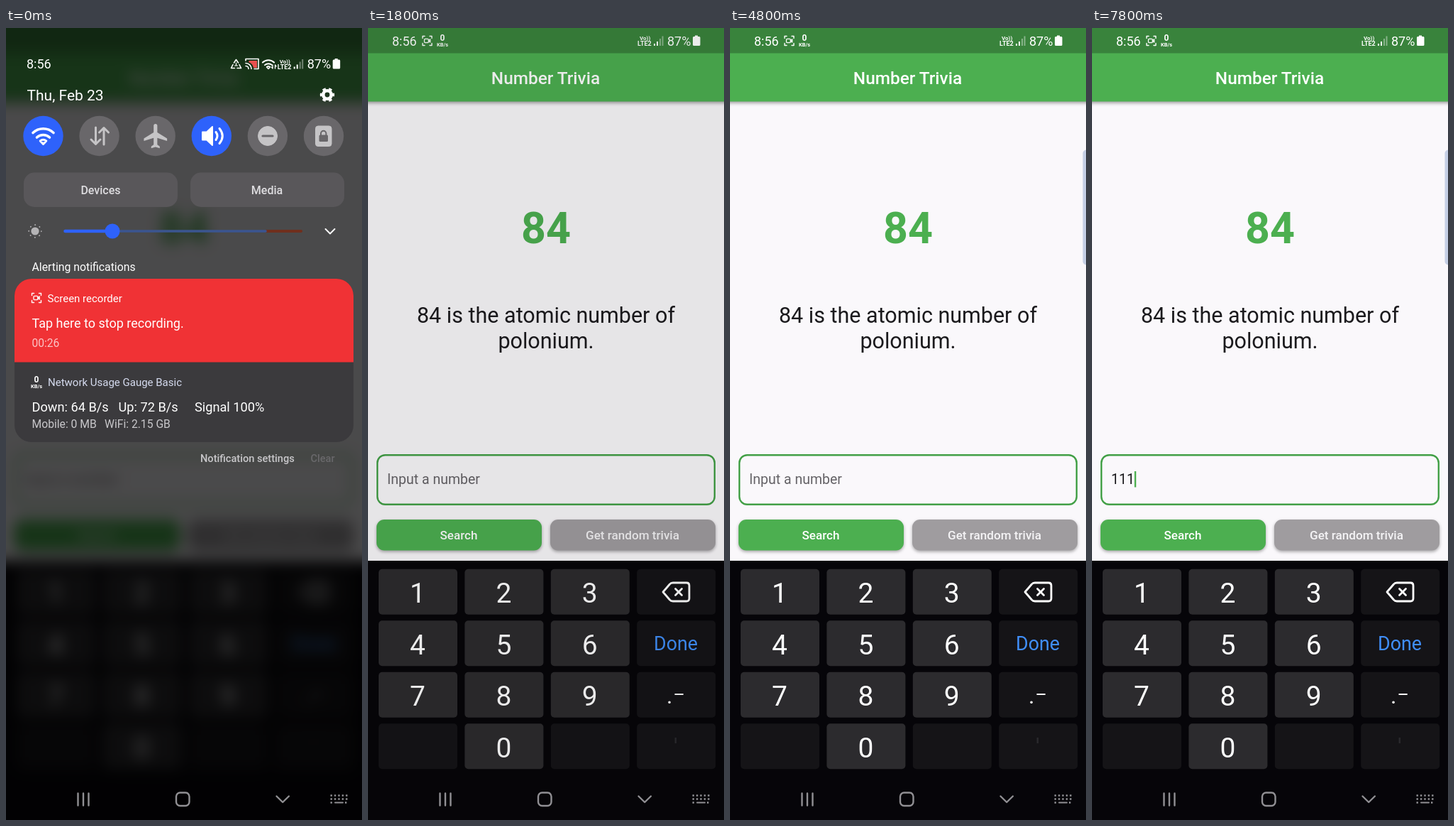
Recreate the animation shown at these times as an HTML page. Size 502 px wide and 1115 px high, loop 8000 ms.

```html
<!DOCTYPE html>
<html lang="en">
<head>
<meta charset="utf-8">
<title>Number Trivia</title>
<style>
  html, body { margin: 0; width: 100%; height: 100%; overflow: hidden; background: #060509; }
  svg { display: block; width: 502px; height: 1115px; font-family: Roboto, sans-serif; }
  .mid { text-anchor: middle; }
  .medium { font-weight: 500; }
  .bold { font-weight: 700; }
  .line { fill: none; stroke-linecap: round; stroke-linejoin: round; }
  .bar { filter: drop-shadow(0 2px 2.5px #0006); }
  .button { filter: drop-shadow(0 2px 2px #0005); }
  .blurred { filter: blur(10px); }
  .tile { fill: #69676a; }
  .tile.on { fill: #2e62fb; }
  .glyph { fill: #c5c4c6; stroke: #c5c4c6; }
  .glyph.on { fill: #fff; stroke: #fff; }
</style>
</head>
<body>
<svg viewBox="0 0 502 1115">
  <defs>
    <g id="recorder" class="line" stroke="currentColor" stroke-width="1.4">
      <path d="M-6.5-3.5v-3h3M3.5-6.5h3v3M6.5 3.5v3h-3M-3.5 6.5h-3v-3"/>
    </g>
    <g id="camera" class="line" stroke="currentColor" stroke-width="1.3">
      <rect x="-4" y="-2.7" width="5.8" height="5.4" rx="1.2"/>
      <path d="M2-.4 4.2-2V2L2 .4"/>
    </g>
    <g id="speed" class="mid bold" fill="currentColor">
      <text y="0" font-size="12">0</text>
      <text y="8" font-size="7.5">KB/s</text>
    </g>
    <g id="phone" fill="#fff">
      <g class="bold">
        <text x="383" y="17" font-size="8">Vo))</text>
        <text x="380" y="25" font-size="9">LTE2</text>
      </g>
      <path d="M403 22h2v3h-2zM407 19h2v6h-2z"/>
      <path d="M411 15h2v10h-2zM414.500 11.500h2v13.500h-2z" opacity=".4"/>
      <text x="422" y="24.500" font-size="18">87%</text>
      <path d="M461 10.500h4v1.500h2a1.500 1.500 0 0 1 1.500 1.500v10a1.500 1.500 0 0 1-1.500 1.500h-7.500a1.500 1.500 0 0 1-1.500-1.500v-10a1.500 1.500 0 0 1 1.500-1.500h1.500z"/>
    </g>
    <g id="wifi">
      <path class="line" stroke-width="3.6" d="M-14.500-4.500A21 21 0 0 1 14.500-4.500M-9 2A13.200 13.200 0 0 1 9 2"/>
      <path class="line" stroke-width="3" d="M-4.300 7A7 7 0 0 1 4.300 7L0 11.500Z"/>
    </g>
    <clipPath id="cardShape"><rect x="12" y="353" width="478" height="230" rx="24"/></clipPath>
  </defs>

  <g id="app">
    <rect x="-60" y="-60" width="622" height="820" fill="#faf8fb"/>
    <text class="mid bold" x="251" y="303" font-size="61" fill="#4caf50">84</text>
    <g class="mid" font-size="30.500" fill="#1b1a1d">
      <text x="251" y="415">84 is the atomic number of</text>
      <text x="251" y="451">polonium.</text>
    </g>
    <rect x="13.200" y="601.200" width="475.600" height="69.600" rx="11" fill="none" stroke="#43a047" stroke-width="2.400"/>
    <text id="entry" x="27" y="641.500" font-size="19.500"></text>
    <rect id="cursor" y="624" width="2.400" height="22.500" fill="#4caf50"/>
    <g class="mid medium" font-size="17.100">
      <rect class="button" x="12" y="692" width="233" height="43.500" rx="11" fill="#4caf50"/>
      <rect class="button" x="257" y="692" width="233" height="43.500" rx="11" fill="#9f9c9f"/>
      <text x="128" y="720" fill="#fff">Search</text>
      <text x="373" y="720" fill="#f5f4f6">Get random trivia</text>
    </g>
    <rect class="bar" x="-60" y="-60" width="622" height="163.500" fill="#4caf50"/>
    <rect x="-60" y="-60" width="622" height="95.500" fill="#39833c"/>
    <text class="mid medium" x="250.500" y="78.500" font-size="24.400" fill="#fff">Number Trivia</text>
    <rect x="-60" y="750" width="622" height="425" fill="#060509"/>
    <g id="keys"></g>
    <g class="line" stroke="#fff" stroke-width="2.800">
      <path d="M416 794 425.500 783Q427 781 430 781H449Q453 781 453 785V803Q453 807 449 807H430Q427 807 425.500 805Z"/>
      <path d="M433.500 789.500l9 9M442.500 789.500l-9 9"/>
    </g>
    <text class="mid" x="434" y="876" font-size="26.800" fill="#408ffa">Done</text>
    <g fill="#fff">
      <text x="421" y="951" font-size="32">.</text>
      <text x="430.500" y="947" font-size="25">–</text>
    </g>
    <rect x="432.500" y="999" width="2.500" height="8" fill="#29282c"/>
  </g>

  <g id="appStatus" color="#fff" fill="#fff">
    <text x="34" y="24.500" font-size="18">8:56</text>
    <use href="#recorder" x="83.500" y="18"/>
    <use href="#camera" class="cameraBlink" x="83.500" y="18"/>
    <use href="#speed" x="105" y="18"/>
    <use href="#phone"/>
  </g>
  <rect id="handle" x="497.500" y="171.500" width="12" height="162" rx="5" fill="#c5cfe5"/>
  <rect id="shade" width="502" height="1115"/>

  <g id="panel" fill="#fff" color="#fff">
    <text x="29" y="57" font-size="18">8:56</text>
    <use href="#phone" x="2.700" y="32.500"/>
    <g id="statusIcons" class="line" stroke="#fff" stroke-width="1.600">
      <path d="M321.500 49 324.500 44.500 327.500 49M329 51.500 331.500 56.500H326M322.500 56.500H317.500L320 51.500"/>
      <path d="M324.500 49v4M322.500 53h4" stroke-width="1.200"/>
      <path d="M343 46H354V56H349Q348 50 342 48Z" fill="#e8504f" stroke="none"/>
      <path d="M338 46V43.500H356V57.500H350M338 49.500A8 8 0 0 1 346 57.500M338 53.500A4 4 0 0 1 342 57.500"/>
    </g>
    <g id="statusWifi" stroke="#fff">
      <use href="#wifi" transform="translate(370 51) scale(.56)"/>
      <path class="line" stroke-width="1.300" d="M376 52v5l-1.500-2M379.500 57v-5l1.500 2"/>
    </g>
    <text x="29.500" y="102" font-size="21">Thu, Feb 23</text>
    <g fill="none" stroke="#fff">
      <circle cx="453" cy="94" r="5.700" stroke-width="4.600"/>
      <circle cx="453" cy="94" r="8.700" stroke-width="3" pathLength="12" stroke-dasharray="1 1" stroke-dashoffset=".5"/>
    </g>

    <circle id="ring" cx="52.500" cy="152" r="32.500" fill="#fff"/>
    <g id="tiles"></g>
    <use id="wifiGlyph" href="#wifi" x="52.500" y="152"/>
    <path class="line glyph" stroke-width="3" style="fill:none" d="M126.500 140v23M120 157l6.500 6.500 6.500-6.500M138 164v-23M131.500 147l6.500-6.500 6.500 6.500"/>
    <path class="glyph" stroke="none" style="stroke:none" transform="translate(191 131.500) scale(1.720)" d="M21 16v-2l-8-5V3.500a1.500 1.500 0 0 0-3 0V9l-8 5v2l8-2.500V19l-2 1.500V22l3.500-1 3.500 1v-1.500L13 19v-5.500z"/>
    <path stroke="#fff" stroke-width="2" stroke-linejoin="round" d="M277 146.500h6l8-7.500v26l-8-7.500h-6z"/>
    <path class="line" stroke="#fff" stroke-width="3" d="M296 146.500q4 5.500 0 11M301 141.500q8.500 10.500 0 21"/>
    <circle class="glyph" cx="369" cy="152" r="13.500"/>
    <path class="line" stroke="#69676a" stroke-width="3.200" d="M362 152h14"/>
    <rect class="glyph" x="436.500" y="138" width="22.500" height="28.500" rx="3.500"/>
    <rect class="tile" x="441.500" y="150.500" width="12.500" height="9.500" rx="1.500"/>
    <path class="line" stroke="#69676a" stroke-width="2" d="M444 151v-2.500a3.700 3.700 0 0 1 7.400 0v2.500"/>

    <g class="mid medium" font-size="16">
      <rect x="25" y="203.500" width="217" height="48.500" rx="15" fill="#59575a"/>
      <rect x="260" y="203.500" width="217" height="48.500" rx="15" fill="#59575a"/>
      <text x="133.500" y="233.500" fill="#dedde0">Devices</text>
      <text x="368" y="233.500" fill="#dedde0">Media</text>
    </g>
    <g class="line">
      <circle cx="41" cy="286" r="5.600" fill="#b5b4b6"/>
      <circle cx="41" cy="286" r="8.800" stroke="#b5b4b6" stroke-width="1.700" pathLength="16" stroke-dasharray=".1 1.900"/>
      <path d="M367 286h49" stroke="#702f1d" stroke-width="4"/>
      <path d="M150 286h216" stroke="#3b5590" stroke-width="3.600"/>
      <path d="M83.500 286H150" stroke="#2e62fb" stroke-width="4.500"/>
      <circle cx="150" cy="286" r="10.500" fill="#2e62fb"/>
      <path d="M450.500 283l6.500 6.500 6.500-6.500" stroke="#fff" stroke-width="1.900"/>
    </g>

    <g id="notifications">
      <text x="36.500" y="342" font-size="15.800">Alerting notifications</text>
      <g clip-path="url(#cardShape)">
        <rect x="12" y="353" width="478" height="230" fill="#3b3a3d"/>
        <rect x="12" y="353" width="478" height="117.500" fill="#f03235"/>
      </g>
      <use href="#recorder" x="43" y="380"/>
      <use href="#camera" class="cameraBlink" x="43" y="380"/>
      <text x="58.500" y="385.500" font-size="15">Screen recorder</text>
      <text x="36.500" y="421.500" font-size="18">Tap here to stop recording.</text>
      <text id="timer" x="36.500" y="448.500" font-size="15.600" fill="#fbc4c5"></text>
      <use href="#speed" x="43" y="498.500"/>
      <text x="59" y="504" font-size="15" fill="#d6dcf0">Network Usage Gauge Basic</text>
      <g font-size="18.200">
        <text id="down" x="36.500" y="540"></text>
        <text id="up" x="158.500" y="540"></text>
        <text x="266" y="540">Signal 100%</text>
      </g>
      <g font-size="15.700" fill="#c9c8cb">
        <text x="36.500" y="563">Mobile: 0 MB</text>
        <text x="139" y="563">WiFi: 2.15 GB</text>
      </g>
    </g>
    <g id="compact">
      <use href="#recorder" x="43" y="346"/>
      <use href="#camera" x="43" y="346"/>
      <use href="#speed" x="65" y="347"/>
    </g>
    <g id="footer" class="medium" font-size="14.600">
      <text x="274" y="611" fill="#c8c7ca">Notification settings</text>
      <text x="429.500" y="611" fill="#69686b">Clear</text>
    </g>
    <text id="carrier" class="mid" x="251" y="1038.500" font-size="13" fill="#77767a">itavelis</text>
  </g>

  <g class="line" stroke="#919094" stroke-width="2.400">
    <path d="M101.500 1077.500v17M109 1077.500v17M116.500 1077.500v17"/>
    <rect x="240" y="1076.500" width="18.500" height="18.500" rx="5.500"/>
    <path d="M381.500 1081.500l8.700 8.500 8.700-8.500"/>
    <path stroke-linecap="butt" stroke-dasharray="2.400 3" d="M457.500 1080.500h25M457.500 1085.500h25M457.500 1090.500h4M478 1090.500h4"/>
    <path stroke-width="2" d="M464 1090.500h11"/>
  </g>
</svg>
<script>
const LOOP = 8000, STEP = 100;
const $ = id => document.getElementById(id);
const show = (el, on) => { el.style.display = on ? '' : 'none'; };
const ramp = (t, from, to) => Math.min(1, Math.max(0, (t - from) / (to - from)));
const during = (t, from, to) => t >= from && t < to;

function add(parent, tag, attrs, text = '') {
  const el = document.createElementNS('http://www.w3.org/2000/svg', tag);
  for (const name in attrs) el.setAttribute(name, attrs[name]);
  el.textContent = text;
  return parent.appendChild(el);
}

['123', '456', '789', ' 0 '].forEach((digits, row) => {
  for (let col = 0; col < 4; col++) {
    const label = (digits[col] || '').trim();
    const x = 15 + col * 121.4, y = 761.7 + row * 72.5;
    const key = add($('keys'), 'rect', {
      x, y, width: 111, height: 64, rx: 5, fill: label ? '#2c2b2e' : '#151417'
    });
    if (!label) continue;
    key.id = 'key' + label;
    add($('keys'), 'text', { x: x + 55, y: y + 47.5, 'font-size': 39, class: 'mid', fill: '#fff' }, label);
  }
});

const tiles = [0, 1, 2, 3, 4, 5].map(i => add($('tiles'), 'circle', {
  cx: 52.5 + i * 79.1, cy: 152, r: 28.2, class: i === 3 ? 'tile on' : 'tile'
}));

function drawPanel(t) {
  const collapsed = t >= 1700;
  const wifiOn = t < 1200;
  const statusWifi = t < 1400;
  const fresh = t >= 300;
  show($('notifications'), !collapsed);
  show($('compact'), collapsed);
  $('footer').setAttribute('transform', `translate(0 ${collapsed ? -259.5 : 0})`);
  $('carrier').style.opacity = ramp(t, 0, 400);
  $('timer').textContent = t < 800 ? '00:26' : '00:27';
  $('down').textContent = `Down: ${fresh ? 52 : 64} B/s`;
  $('up').textContent = `Up: ${fresh ? 52 : 72} B/s`;
  $('ring').style.opacity = t < 1000 ? 0 : 0.2 * (1 - ramp(t, 1100, 1500));
  tiles[0].classList.toggle('on', wifiOn);
  $('wifiGlyph').setAttribute('class', wifiOn ? 'glyph on' : 'glyph');
  show($('statusWifi'), statusWifi);
  $('statusIcons').setAttribute('transform', `translate(${statusWifi ? 0 : 22} 0)`);
}

function drawEntry(t) {
  const typed = Math.min(3, Math.max(0, Math.floor((t - 6700) / 200)));
  $('entry').textContent = typed ? '1'.repeat(typed) : 'Input a number';
  $('entry').setAttribute('fill', typed ? '#1b1a1d' : '#656367');
  $('cursor').setAttribute('x', 27 + typed * 10.95);
  show($('cursor'), t >= 6900 || (t >= 1900 && Math.floor((t - 1900) / 500) % 2 === 0));
  const pressed = during(t, 6800, 7400) && t % 200 < 100;
  $('key1').setAttribute('fill', pressed ? '#49484c' : '#2c2b2e');
}

function draw(t) {
  const panelOpen = t < 1800;
  $('app').setAttribute('class', t < 1700 ? 'blurred' : '');
  show($('panel'), panelOpen);
  show($('appStatus'), !panelOpen);
  $('shade').style.opacity = panelOpen ? 0.7 : t < 1900 ? 0.08 : 0;
  $('handle').style.opacity = ramp(t, 2100, 2400);
  const camera = panelOpen ? !during(t, 800, 1300) : Math.floor((t - 1800) / 500) % 2 === 0;
  document.querySelectorAll('.cameraBlink').forEach(el => show(el, camera));
  if (panelOpen) drawPanel(t);
  drawEntry(t);
}

const start = performance.now();
function tick() {
  const elapsed = Math.max(0, performance.now() - start) % LOOP;
  draw(Math.floor(elapsed / STEP) * STEP);
  requestAnimationFrame(tick);
}
tick();
</script>
</body>
</html>
```
